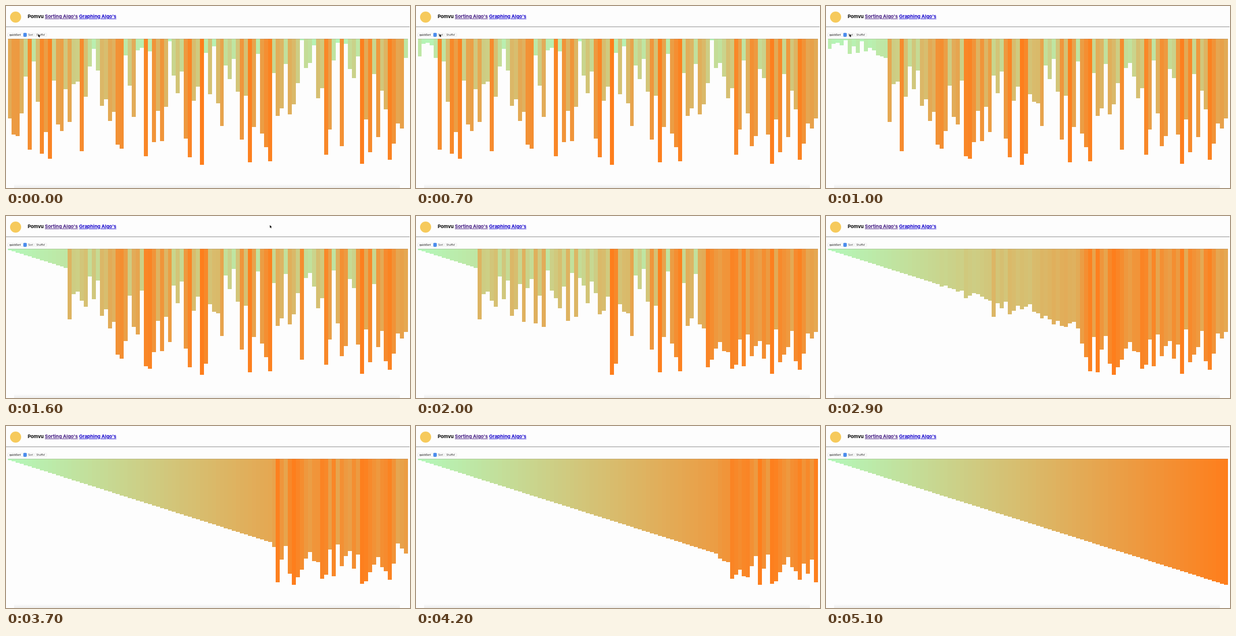
Write an HTML page that moves like this. It is 800 px wide and 361 px high and loops after 5200 ms.

```html
<!DOCTYPE html>
<html lang="en">
<head>
<meta charset="utf-8">
<title>Sorting bars</title>
<style>
  html, body { margin: 0; width: 100%; height: 100%; overflow: hidden; background: #fdfdfd; }
  svg { display: block; font-family: Inter, sans-serif; }
  .nav { font-size: 9.4px; font-weight: 700; }
  .link { text-decoration: underline; }
  .ui { font-size: 4.8px; fill: #222; }
  .box { fill: #fff; stroke: #d4d4d4; stroke-width: .5; }
</style>
</head>
<body>
<svg width="800" height="361" viewBox="0 0 800 361">
  <defs>
    <linearGradient id="shade" x2="0" y2="1">
      <stop offset="0" stop-color="#fdfdfd"/>
      <stop offset="1" stop-color="#ececec"/>
    </linearGradient>
  </defs>
  <rect x="16" y="353" width="764" height="8" fill="url(#shade)"/>

  <circle cx="19" cy="22" r="11" fill="#f6ca5c"/>
  <g class="nav">
    <text x="43" y="24">Pomvu</text>
    <text x="77" y="24" class="link" fill="#431a82">Sorting Algo's</text>
    <text x="144.7" y="24" class="link" fill="#1200cc">Graphing Algo's</text>
  </g>
  <rect y="40.7" width="799" height="1" fill="#858585"/>

  <rect class="box" x="3.5" y="54" width="37" height="6.8" rx="1.5"/>
  <rect x="34.5" y="53.6" width="6.4" height="7.4" rx="1.4" fill="#2f7bea"/>
  <path d="M36.4 56.6l1.3-1.4 1.3 1.4M36.4 58l1.3 1.4 1.3-1.4" fill="none" stroke="#fff" stroke-width=".6"/>
  <rect class="box" x="42.6" y="54" width="12.6" height="6.8" rx="1.5"/>
  <rect class="box" x="57.2" y="54" width="23.3" height="6.8" rx="1.5"/>
  <g class="ui">
    <text x="6.7" y="59" font-weight="600">quickSort</text>
    <text x="44" y="59">Sort</text>
    <text x="60" y="59">Shuffle!</text>
  </g>

  <g id="bars" shape-rendering="crispEdges"></g>
  <rect x="3.5" y="65" width="792.5" height=".8" fill="#776e6e" opacity=".35"/>
  <path id="cursor" d="M0 0V5.6L1.3 4.4 2.2 6.4 3.1 6 2.2 4.1H3.9Z" stroke="#fff" stroke-width=".5" paint-order="stroke"/>
</svg>
<script>
const LOOP = 5200, STEP = 100, LEFT = 3.5, TOP = 65, WIDTH = 7.925, UNIT = 2.5;

const values = [
  63, 76, 77, 59, 30, 88, 18, 50, 91, 74, 95, 33, 68, 73, 40, 66, 36, 34, 89, 46,
  22, 8, 25, 53, 48, 65, 58, 84, 87, 13, 37, 62, 9, 7, 93, 10, 82, 57, 81, 54,
  2, 29, 43, 26, 79, 94, 49, 38, 100, 11, 44, 6, 51, 69, 21, 32, 16, 42, 80, 45,
  98, 70, 12, 75, 86, 97, 27, 61, 55, 20, 60, 52, 35, 1, 23, 19, 5, 47, 39, 92,
  72, 17, 3, 85, 4, 24, 31, 14, 99, 64, 90, 28, 78, 41, 56, 96, 83, 67, 71, 15];

// Every call and every swap takes one tick; swapTick[n] is the tick of the nth swap.
const states = [], swapTick = [0];
const record = () => states.push([...values]);

function quickSort(lo, hi) {
  record();
  if (lo >= hi) return;
  const pivot = values[hi];
  let i = lo, j = hi;
  while (i < j) {
    while (values[i] < pivot) i++;
    while (values[j] > pivot) j--;
    if (i < j) {
      [values[i], values[j]] = [values[j], values[i]];
      swapTick.push(states.length);
      record();
    }
  }
  quickSort(lo, i - 1);
  quickSort(i + 1, hi);
}
quickSort(0, values.length - 1);

// [time, swaps done]
const pace = [[480, 0], [700, 9], [1200, 39], [1600, 46], [2300, 86], [2900, 128],
  [3700, 159], [4250, 181], [4750, swapTick.length - 1]].map(([t, n]) => [t, swapTick[n]]);
// [time, x, y]
const cursorPath = [[0, 64, 56], [100, 63, 56], [400, 46.5, 55.5], [1000, 46.5, 55.5],
  [1600, 522.5, 18], [1900, 640, -10]];

function along(keys, t, column = 1) {
  const next = keys.findIndex(key => key[0] > t);
  if (next === 0) return keys[0][column];
  if (next < 0) return keys[keys.length - 1][column];
  const a = keys[next - 1], b = keys[next];
  return a[column] + (b[column] - a[column]) * (t - a[0]) / (b[0] - a[0]);
}

function color(value) {
  const k = (value - 1) / 99;
  return `rgb(${180 + 74 * k},${247 - 121 * k},${186 - 158 * k})`;
}

const bars = values.map((_, i) => {
  const bar = document.createElementNS("http://www.w3.org/2000/svg", "rect");
  bar.setAttribute("x", LEFT + i * WIDTH);
  bar.setAttribute("y", TOP);
  bar.setAttribute("width", WIDTH);
  document.getElementById("bars").append(bar);
  return bar;
});
const cursor = document.getElementById("cursor");

function draw() {
  const t = Math.floor(performance.now() % LOOP / STEP) * STEP;
  const state = states[Math.floor(along(pace, t) + 0.01)];
  bars.forEach((bar, i) => {
    bar.setAttribute("height", state[i] * UNIT);
    bar.setAttribute("fill", color(state[i]));
  });
  cursor.setAttribute("transform", `translate(${along(cursorPath, t, 1)} ${along(cursorPath, t, 2)})`);
  requestAnimationFrame(draw);
}
draw();
</script>
</body>
</html>
```
